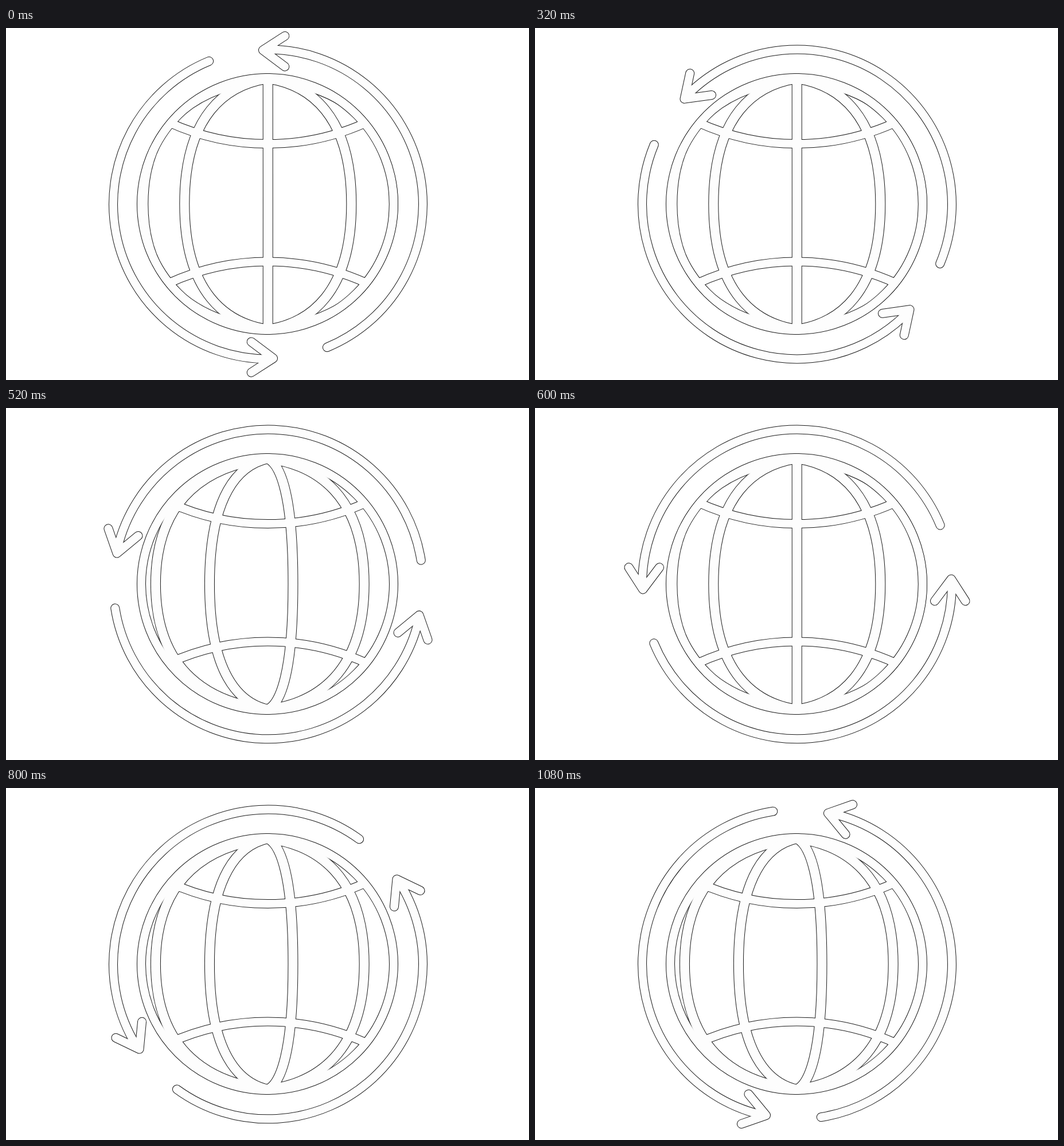
These frames come from a looping animation (912x614 px, 1120 ms). An HTML page without scripts:

```html
<!DOCTYPE html>
<html lang="en">
<head>
<meta charset="utf-8">
<title>Spinning globe</title>
<style>
html, body { margin: 0; width: 100%; height: 100%; overflow: hidden; background: #fff; }

/* --n counts ticks: ten move the globe by one meridian, forty turn the arrows by half */
@property --n { syntax: "<number>"; inherits: true; initial-value: 0; }

svg {
  display: block;
  width: 912px;
  height: 614px;
  fill: none;
  stroke-linejoin: round;
  animation: tick 1120ms step-end infinite;
}

/* The same strokes twice: wide dark below, narrow light above leaves one outline */
.edge { stroke: #1c1c1c; --e: 2px; }
.face { stroke: #fdfdfd; --e: 0px; }

.line { stroke-width: calc(14px + var(--e)); }
.cap { stroke-linecap: round; }

.globe { clip-path: circle(calc(227px + var(--e) / 2) at 456px 307px) view-box; }

.mer {
  --p: calc(var(--j) * 10 - var(--n));
  --mid: max(-10, min(10, var(--p)));
  --out: calc(var(--p) - var(--mid));
  --x: calc(var(--mid) * 14.55 + var(--out) * 7.2 + max(0, var(--out)) * .25 + .1);
  d: path("M0-219C109.5-208 219-155.5 219 0S109.5 208 0 219");
  stroke-width: calc(16px + var(--e));
  vector-effect: non-scaling-stroke;
  transform: scaleX(calc(var(--x) / 219));
  opacity: calc(21 - max(var(--p), -1 * var(--p)));
}

.spin { transform: rotate(calc(var(--n) * -4.5deg)); }

@keyframes tick {
  0% { --n: 0 }
  7.14% { --n: 1 }
  10.71% { --n: 2 }
  14.28% { --n: 4 }
  17.85% { --n: 5 }
  21.42% { --n: 7 }
  24.99% { --n: 8 }
  28.57% { --n: 10 }
  32.14% { --n: 11 }
  35.71% { --n: 13 }
  39.28% { --n: 14 }
  42.85% { --n: 16 }
  46.42% { --n: 17 }
  49.99% { --n: 19 }
  53.57% { --n: 20 }
  57.14% { --n: 22 }
  60.71% { --n: 23 }
  64.28% { --n: 25 }
  67.85% { --n: 26 }
  71.42% { --n: 27 }
  74.99% { --n: 29 }
  78.57% { --n: 30 }
  82.14% { --n: 32 }
  85.71% { --n: 33 }
  89.28% { --n: 35 }
  92.85% { --n: 36 }
  96.42%, 100% { --n: 37 }
}
</style>
</head>
<body>
<svg viewBox="0 0 912 614">
  <defs>
    <g id="arrow" class="line cap">
      <path d="M0-270A270 270 0 0 1 102.9 249.6"/>
      <path d="M29.3-293.5L-9-268.8L29.3-240M-9-268.8L0-270"/>
    </g>
    <g id="shape">
      <circle class="line" cx="456" cy="307" r="220"/>
      <path class="line" d="M284.5 164.8A415 415 0 0 0 628.5 164.8M284.5 444.9A415 415 0 0 1 628.5 444.9"/>
      <g class="globe">
        <g transform="translate(456.7 307)">
          <path class="mer" style="--j:-2"/>
          <path class="mer" style="--j:-1"/>
          <path class="mer" style="--j:0"/>
          <path class="mer" style="--j:1"/>
          <path class="mer" style="--j:2"/>
          <path class="mer" style="--j:3"/>
          <path class="mer" style="--j:4"/>
          <path class="mer" style="--j:5"/>
        </g>
      </g>
      <g transform="translate(457 307.4)">
        <g class="spin">
          <use href="#arrow"/>
          <use href="#arrow" transform="rotate(180)"/>
        </g>
      </g>
    </g>
  </defs>
  <use class="edge" href="#shape"/>
  <use class="face" href="#shape"/>
</svg>
</body>
</html>
```
